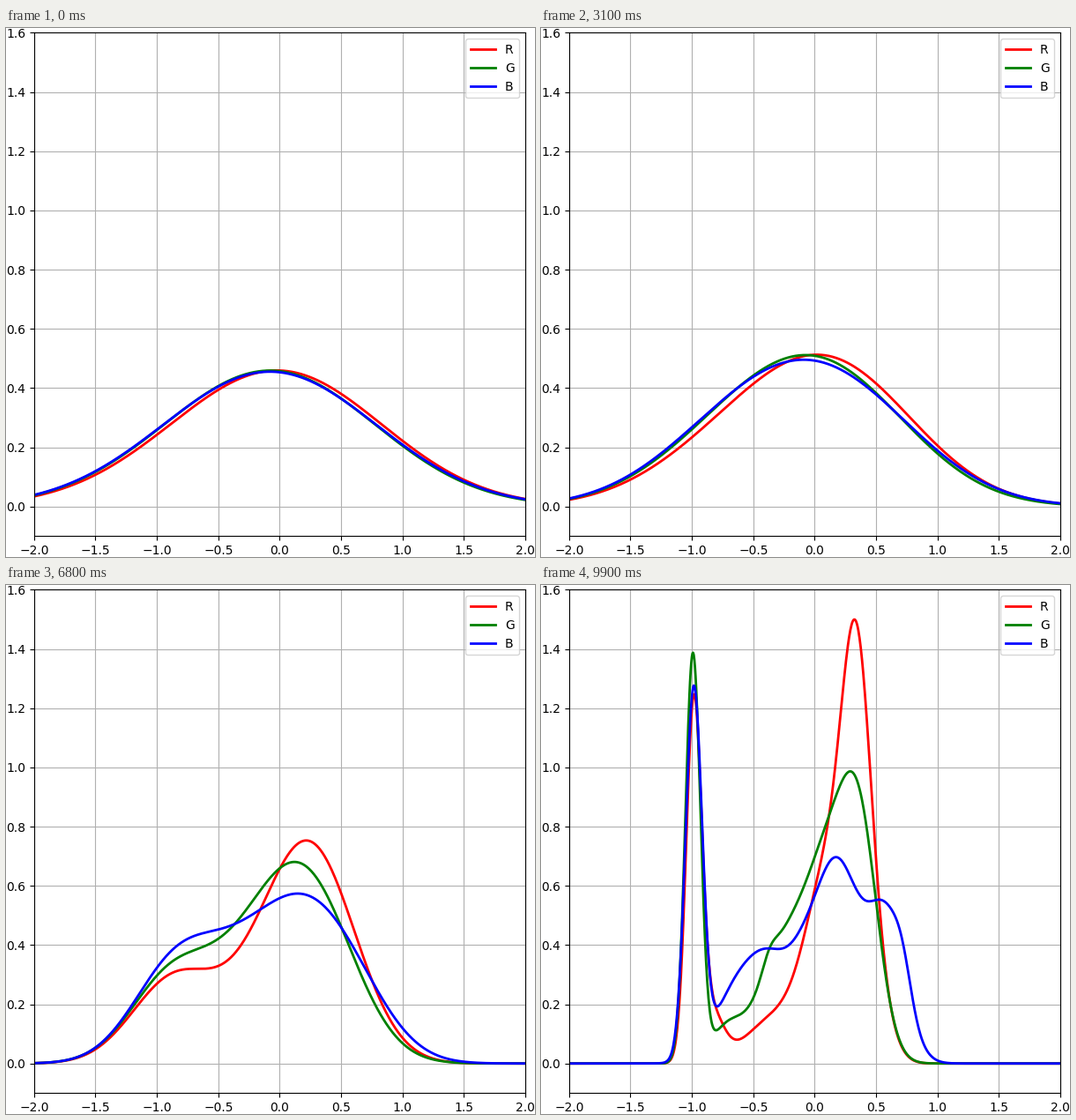
Animation, 600 px wide and 600 px high, one loop 10000 ms. Source, as a matplotlib script:

```python
import numpy as np
import matplotlib.pyplot as plt
from matplotlib.animation import FuncAnimation

FRAMES, INTERVAL = 100, 100
X = np.linspace(-2, 2, 801)

# Clean distributions as Gaussian bumps: height, mean, width
BUMPS = {
    "red": [(1.175, -.985, .062), (.17, -.85, .10), (.15, -.32, .24),
            (.61, .11, .18), (1.18, .343, .12), (.13, .53, .12)],
    "green": [(1.375, -.992, .061), (.11, -.72, .13), (.045, -.37, .06),
              (.34, -.28, .20), (.65, .12, .20), (.62, .375, .15)],
    "blue": [(1.24, -.985, .067), (.085, -.72, .15), (.37, -.40, .24),
             (.075, -.10, .12), (.66, .18, .19), (.46, .585, .15),
             (.085, .72, .07)],
}


def density(color, step):
    """Reverse diffusion: shrink the clean bumps and blur them with noise."""
    t = 1 - step / (FRAMES - 1)
    scale = 1 - 0.22 * t - 0.23 * t ** 2
    noise = 0.83 * np.sin(1.3 * t)
    y = np.zeros_like(X)
    for height, mean, width in BUMPS[color]:
        blurred = np.hypot(scale * width, noise)
        z = (X - scale * mean) / blurred
        y += height * width / blurred * np.exp(-z ** 2 / 2)
    return y


fig, ax = plt.subplots(figsize=(6, 6), dpi=100)
ax.set_xlim(-2, 2)
ax.set_ylim(-0.1, 1.6)
ax.grid(True)
lines = {color: ax.plot(X, density(color, 0), color=color, lw=2,
                        label=color[0].upper())[0]
         for color in BUMPS}
ax.legend(loc="upper right")
fig.tight_layout(pad=0)


def update(step):
    for color, line in lines.items():
        line.set_ydata(density(color, step))
    return list(lines.values())


anim = FuncAnimation(fig, update, frames=FRAMES, interval=INTERVAL,
                     repeat=True, repeat_delay=0)
plt.show()
```
